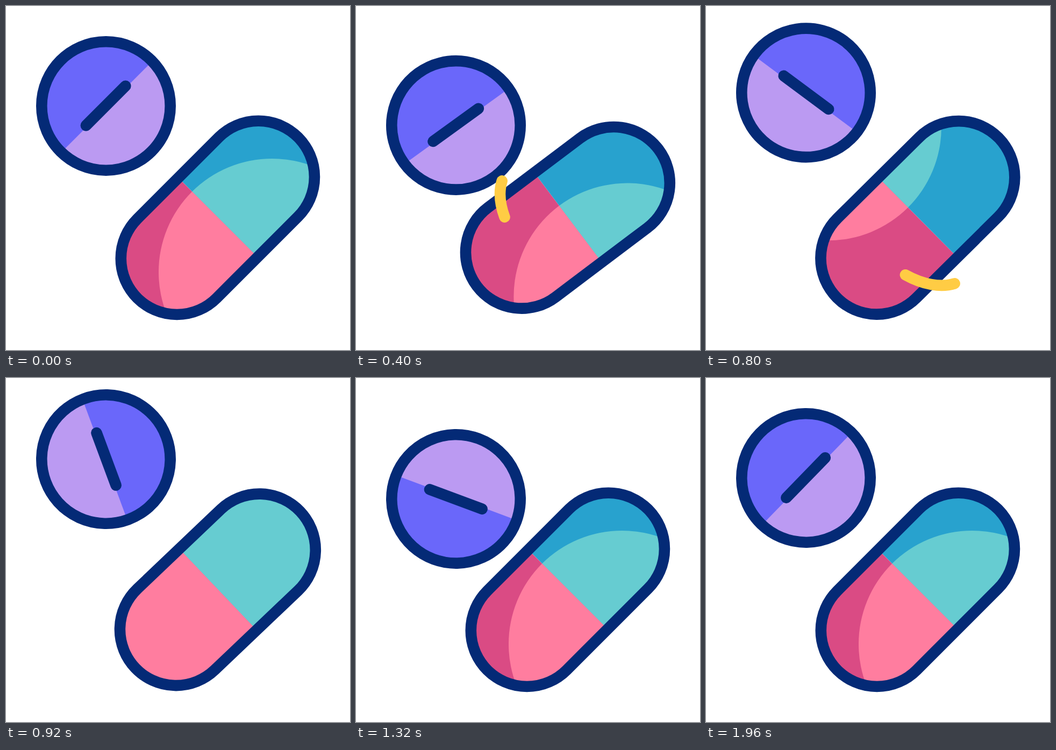
These frames come from a looping animation (640x640 px, 2 s). An HTML page:

```html
<!DOCTYPE html>
<html lang="en">
<head>
<meta charset="utf-8">
<title>Pills</title>
<style>
  html, body { margin: 0; width: 100%; height: 100%; overflow: hidden; background: #fff; }
  svg { display: block; width: 100%; height: 100%; }
  .ink { fill: none; stroke: #042a76; stroke-width: 20.6; stroke-linecap: round; }
</style>
</head>
<body>
<svg viewBox="0 0 640 640">
  <defs>
    <clipPath id="disc"><circle r="119.7"/></clipPath>
    <clipPath id="body"><rect x="-211.5" y="-104.5" width="423" height="208.6" rx="104.3"/></clipPath>
    <clipPath id="shine"><circle id="glow" r="211"/></clipPath>
  </defs>

  <g id="capsule">
    <g clip-path="url(#body)">
      <path fill="#da4b84" d="M-220-120H.8V120H-220z"/>
      <path fill="#28a2ce" d="M.8-120H220V120H.8z"/>
      <g clip-path="url(#shine)">
        <path fill="#ff7d9f" d="M-220-120H.8V120H-220z"/>
        <path fill="#66ccd1" d="M.8-120H220V120H.8z"/>
      </g>
    </g>
    <rect class="ink" x="-211.5" y="-104.5" width="423" height="208.6" rx="104.3"/>
  </g>

  <g id="tablet">
    <g clip-path="url(#disc)">
      <path fill="#6a67fa" d="M-130-130H130V130H-130z"/>
      <path fill="#bb9af2" d="M-130 2.2H130V130H-130z"/>
    </g>
    <circle class="ink" r="119.7"/>
    <path class="ink" d="M-52-.6H52"/>
  </g>

  <path id="swoosh" transform="translate(394 394) rotate(-45)" d="M-38-135A89 142 0 0 0-38 135"
    pathLength="100" fill="none" stroke="#ffcc44" stroke-width="20.6" stroke-linecap="round"/>
</svg>
<script>
  const LOOP = 2000, STEP = 40;
  const el = id => document.getElementById(id);
  const capsule = el('capsule'), tablet = el('tablet'), glow = el('glow'), swoosh = el('swoosh');

  const unit = (t, from, to) => Math.min(1, Math.max(0, (t - from) / (to - from)));
  const easeInOut = (x, power = 2) =>
    x < .5 ? (2 * x) ** power / 2 : 1 - (2 - 2 * x) ** power / 2;

  // Swing through turning points [time, value], resting at the last
  const swing = (t, [first, ...rest]) => {
    let value = first[1], from = first[0];
    for (const [to, next] of rest) {
      value += (next - value) * easeInOut(unit(t, from, to));
      if (t < to) break;
      from = to;
    }
    return value;
  };

  const tabletY = t => swing(t, [[120, 186], [470, 225], [919, 151], [1357, 226], [1880, 186]]);
  const tabletTurn = t => 360 * easeInOut(unit(t, 240, 2000), 1.75);
  const capsuleTilt = t => swing(t, [[120, 0], [470, 8.7], [660, -4.7], [870, 1.7], [1040, 0]]);

  // The shine speeds off one side, then slows in from the other
  const shineY = t => t < 640
    ? 142.8 + .00369 * Math.max(0, t - 295) ** 2
    : 142.8 - .00369 * Math.max(0, 1121 - t) ** 2;

  function draw(t) {
    tablet.setAttribute('transform', `translate(186 ${tabletY(t)}) rotate(${tabletTurn(t) - 45})`);
    capsule.setAttribute('transform', `translate(394 394) rotate(${capsuleTilt(t) - 45})`);
    glow.setAttribute('cy', shineY(t));

    const head = 100 * (1 - (1 - unit(t, 360, 700)) ** 2);
    const tail = 100 * unit(t, 440, 920) ** 1.28;
    swoosh.style.display = head > tail ? '' : 'none';
    swoosh.setAttribute('stroke-dasharray', `${head - tail} 300`);
    swoosh.setAttribute('stroke-dashoffset', -tail);
  }

  const start = performance.now();
  function tick() {
    const t = (performance.now() - start) % LOOP;
    draw(Math.floor(t / STEP) * STEP);
    requestAnimationFrame(tick);
  }
  draw(0);
  requestAnimationFrame(tick);
</script>
</body>
</html>
```
